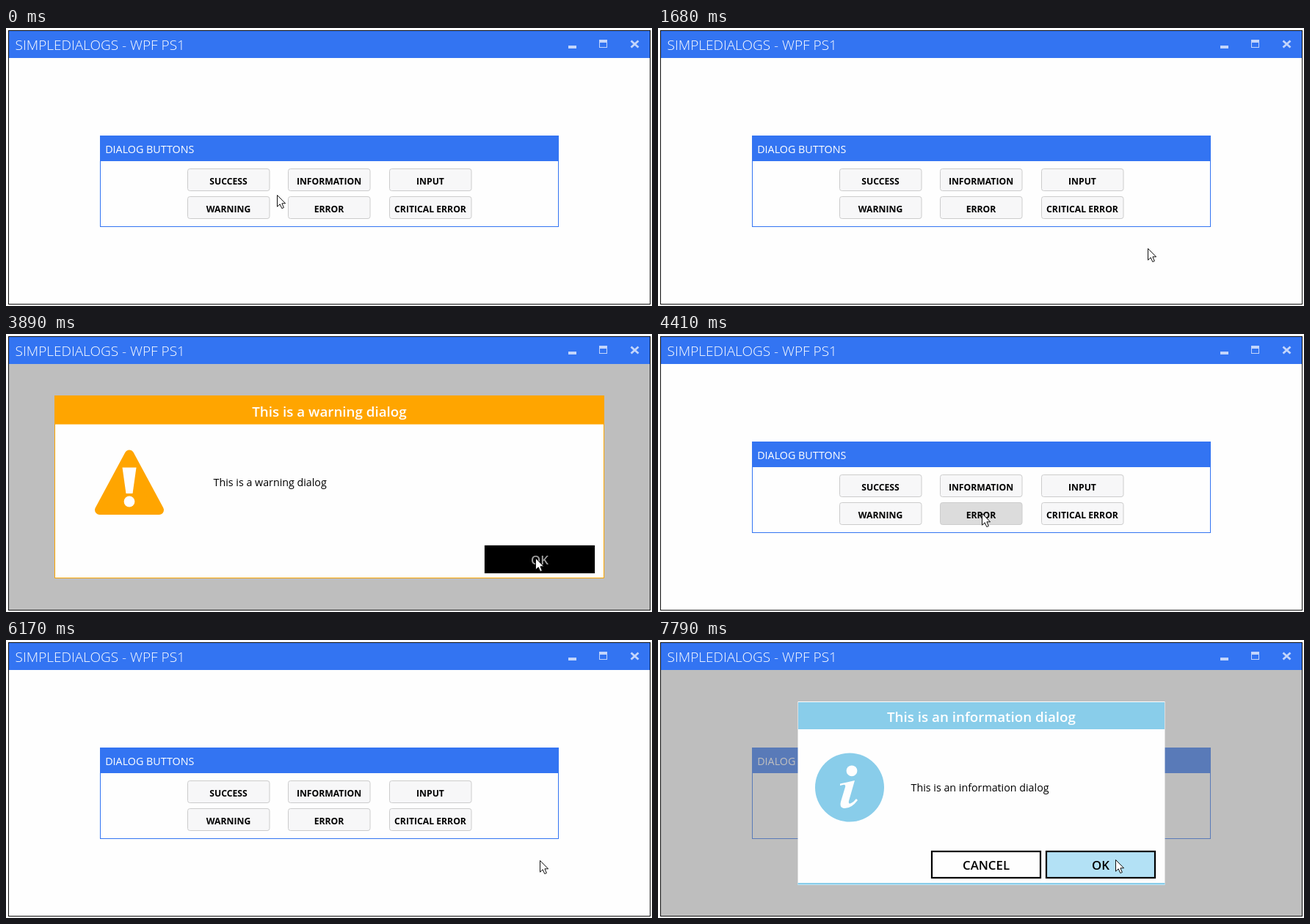
Write an HTML page that moves like this. It is 880 px wide and 380 px high and loops after 8000 ms.

```html
<!DOCTYPE html>
<html lang="en">
<head>
<meta charset="utf-8">
<title>SimpleDialogs</title>
<style>
html, body { margin: 0; width: 100%; height: 100%; overflow: hidden; background: #fff; }
svg { display: block; width: 880px; height: 380px; font-family: "Open Sans", "Noto Sans", sans-serif; }
.head { font-size: 18.8px; font-weight: 600; fill: #fff; text-anchor: middle; }
.body { font-size: 14.25px; fill: #000; }
.btn { font-size: 12.2px; font-weight: 700; text-anchor: middle; }
.cmd { font-size: 16.8px; font-weight: 600; text-anchor: middle; }
</style>
</head>
<body>
<svg id="stage" viewBox="0 0 880 380" xmlns="http://www.w3.org/2000/svg"></svg>
<script>
const LOOP = 8000;
const BLUE = '#3374f2';
const stage = document.getElementById('stage');

function add(parent, tag, attrs, text) {
  const el = document.createElementNS('http://www.w3.org/2000/svg', tag);
  set(el, attrs);
  if (text) el.textContent = text;
  parent.appendChild(el);
  return el;
}
function set(el, attrs) {
  for (const k in attrs) el.setAttribute(k, attrs[k]);
}
const rect = (p, x, y, width, height, fill, more) =>
  add(p, 'rect', { x, y, width, height, fill, ...more });
const label = (p, x, y, cls, text, more) =>
  add(p, 'text', { x, y, class: cls, ...more }, text);
const path = (p, d, fill, more) => add(p, 'path', { d, fill, ...more });
const disc = (p, cx, cy, r, fill) => add(p, 'circle', { cx, cy, r, fill });

// Window
rect(stage, 0, 0, 880, 380, '#fff');
rect(stage, 3.5, 3.5, 874, 374, '#fefefe', { stroke: '#111' });

// Panel with six buttons
rect(stage, 128.5, 147.5, 624, 124, '#fefefe', { stroke: BLUE });
rect(stage, 128, 147, 625, 35, BLUE);
label(stage, 135.2, 171, '', 'DIALOG BUTTONS', { 'font-size': 14.3, fill: '#fff' });

const names = ['SUCCESS', 'INFORMATION', 'INPUT', 'WARNING', 'ERROR', 'CRITICAL ERROR'];
const buttons = names.map((name, i) => {
  const x = 247 + 137.5 * (i % 3) - (i % 3 === 1 ? 0.5 : 0);
  const y = i < 3 ? 192 : 230;
  const box = rect(stage, x + 0.5, y + 0.5, 111.5, 30, '#f7f7f8', { rx: 3, stroke: '#ccc' });
  label(stage, x + 56, y + 21.7, 'btn', name);
  return { name, x, y, w: 112, h: 31, box };
});

const shade = rect(stage, 4, 41, 873, 336, '#808080', { opacity: 0.5 });

// Title bar
rect(stage, 4, 4, 873, 37, BLUE);
label(stage, 12.6, 30, '', 'SIMPLEDIALOGS - WPF PS1', { 'font-size': 19, 'font-weight': 300, fill: '#fff' });
const glyph = '#c3d5fb';
rect(stage, 766, 24, 11, 4, glyph);
path(stage, 'M808 16H819V27H808ZM809 20V26H818V20Z', glyph, { 'fill-rule': 'evenodd' });
path(stage, 'M851.5 17.5L861.5 26.5M861.5 17.5L851.5 26.5', 'none', { stroke: glyph, 'stroke-width': 2.8 });

// Dialogs
function command(p, x, y, text) {
  const box = rect(p, x + 1, y + 1, 148, 36, '#fefefe', { stroke: '#000', 'stroke-width': 2.2 });
  const word = label(p, x + 75, y + 25.8, 'cmd', text);
  return { x, y, w: 150, h: 38, box, word };
}

function bang(p, y, h, dotY) {
  path(p, `M158.5 ${y}H177.5L172.5 ${y + h}H163.5Z`, '#fefefe');
  disc(p, 168, dotY, 7.4, '#fefefe');
}

const icons = {
  success(g, color) {
    disc(g, 168, 203, 47, color);
    path(g, 'M145 204L161 220L192 187', 'none', { stroke: '#fefefe', 'stroke-width': 10 });
  },
  warning(g, color) {
    path(g, 'M168 165L208.5 240.5H127.5Z', color, { stroke: color, 'stroke-width': 13, 'stroke-linejoin': 'round' });
    bang(g, 182.5, 35.5, 229);
  },
  error(g, color) {
    disc(g, 168, 203, 47, color);
    bang(g, 172.5, 40, 226.5);
  },
  information(g, color) {
    disc(g, 261, 201.5, 47, color);
    disc(g, 264, 178.8, 7.4, '#fefefe');
    path(g, 'M248 196.5L268 192L260 220Q259 225 263 223Q267 221 270 217L272 219Q263 231 253 230' +
      'Q247 229 249 221L255 201Q256 197 252 198L248 199Z', '#fefefe');
  }
};

function dialog(kind, color, hover, open, press, close) {
  const g = add(stage, 'g', {});
  const info = kind === 'information';
  const text = `This is a${info ? 'n' : ''} ${kind} dialog`;
  if (info) {
    rect(g, 190.5, 84, 500, 251, '#fefefe');
    rect(g, 191, 85, 499, 37, color);
    rect(g, 190.5, 332, 500, 2.5, color);
    command(g, 372, 288, 'CANCEL').y -= 1;
  } else {
    rect(g, 66.5, 84.5, 748, 249, '#fefefe', { stroke: color });
    rect(g, 66, 84, 749, 39.5, color);
  }
  label(g, 440.5, info ? 112 : 113, 'head', text);
  label(g, info ? 344.6 : 282.6, info ? 207 : 208, 'body', text);
  icons[kind](g, color);
  const ok = info ? command(g, 528, 288, 'OK') : command(g, 652, 289, 'OK');
  return { g, kind, color, hover, open, press, close, ok };
}

const dialogs = [
  dialog('success', '#3cb371', '#8ad1aa', 620, 1510, 1680),
  dialog('warning', '#ffa500', '#ffc861', 2580, 3890, 4030),
  dialog('error', '#ff6347', '#ff9e8d', 4860, 6030, 6170),
  dialog('information', '#89cdea', '#b3e1f5', 7130, LOOP, LOOP)
];

// Times at which a panel button goes down; it stays so until the dialog opens
const clicks = [['SUCCESS', 480, 620], ['WARNING', 2440, 2580], ['ERROR', 4720, 4860], ['INFORMATION', 7000, 7130]];

// Pointer
const pointer = path(stage, 'M.5 .5V16.2L4.2 12.8L6.8 18.6L9.4 17.5L6.9 11.8H11.6Z', '#fff',
  { stroke: '#111', 'stroke-width': 1, 'stroke-linejoin': 'round' });

// start, end, steps, target x, target y
const origin = [369, 228];
const moves = [
  [30, 310, 7, 322, 212],
  [660, 1170, 14, 667, 301],
  [1720, 2270, 17, 319, 247],
  [2720, 3270, 17, 721, 306],
  [4070, 4410, 11, 441, 245],
  [5000, 5100, 4, 655, 262],
  [5137, 5550, 12, 727, 301],
  [6240, 6790, 17, 469, 213],
  [7310, 7790, 15, 623, 300]
];

function pointerAt(t) {
  let [x, y] = origin;
  for (const [start, end, steps, tx, ty] of moves) {
    if (t < start) break;
    const k = Math.floor((t - start) / (end - start) * (steps - 1) + 0.02);
    const p = Math.min(1, (k + 1) / steps);
    const e = 1 - Math.pow(1 - p, 2.4);
    x += (tx - x) * e;
    y += (ty - y) * e;
  }
  return [Math.round(x), Math.round(y)];
}

const inside = (b, x, y) => x >= b.x && x < b.x + b.w && y >= b.y && y < b.y + b.h;

function draw(t) {
  const [x, y] = pointerAt(t);
  const shown = dialogs.find(d => t >= d.open && t < d.close);
  set(pointer, { transform: `translate(${x} ${y})` });
  set(shade, { visibility: shown ? 'visible' : 'hidden' });

  for (const b of buttons) {
    const down = clicks.some(([name, from, to]) => name === b.name && t >= from && t < to);
    const over = !shown && inside(b, x, y);
    set(b.box, {
      fill: down ? '#b9b9b9' : over ? '#dcdcdc' : '#f7f7f8',
      stroke: down ? '#999' : '#ccc'
    });
  }

  for (const d of dialogs) {
    set(d.g, { visibility: d === shown ? 'visible' : 'hidden' });
    const down = t >= d.press;
    const over = inside(d.ok, x, y);
    set(d.ok.box, { fill: down ? '#000' : over ? d.hover : d.color });
    set(d.ok.word, { fill: down ? '#a0a0a0' : over ? '#000' : '#fff' });
  }
}

const began = performance.now();
function tick() {
  draw((performance.now() - began) % LOOP);
  requestAnimationFrame(tick);
}
draw(0);
requestAnimationFrame(tick);
</script>
</body>
</html>
```
